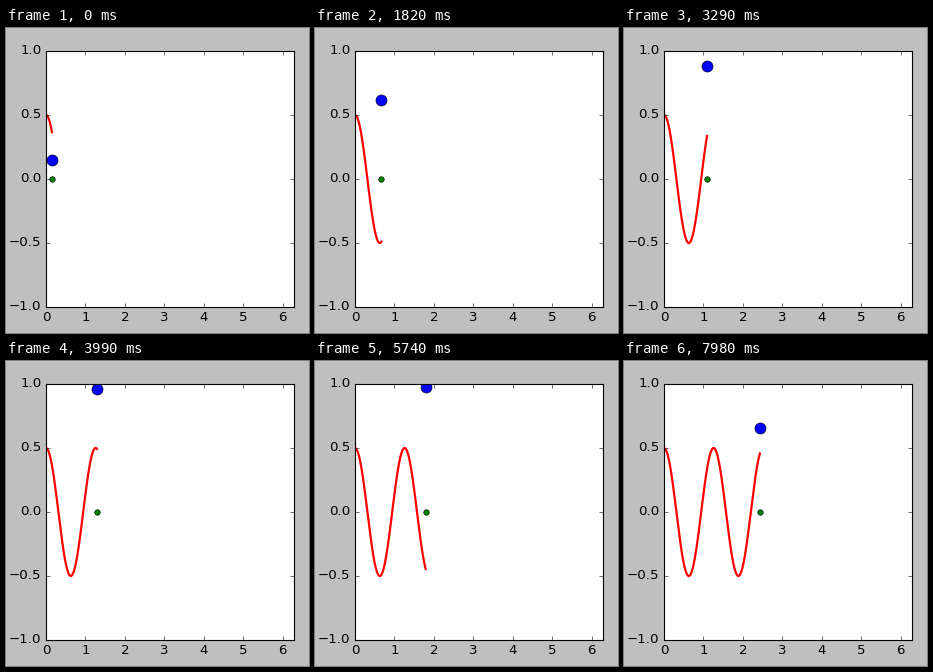
A matplotlib script for the animation above (8 s loop, 303 by 305 pixels).

```python
import numpy as np
import matplotlib.pyplot as plt
from matplotlib.animation import FuncAnimation

plt.style.use("classic")

W, H, DPI = 303, 305, 80
TICK, HOLD, LOOP = 20, 70, 8000   # ms
X0, DX = 0.15, 0.02               # start and advance per step

fig = plt.figure(figsize=(W / DPI, H / DPI), dpi=DPI, facecolor="0.75")
ax = fig.add_axes([40 / W, 26 / H, 248 / W, 256 / H])
ax.set_xlim(0, 2 * np.pi)
ax.set_ylim(-1, 1)
ax.set_xticks(range(7))
ax.set_yticks(np.arange(-1, 1.1, 0.5))

wave, = ax.plot([], [], "r-", lw=2)
ball, = ax.plot([], [], "bo", ms=10)
dot, = ax.plot([], [], "go", ms=5)


def update(i):
    step = (i * TICK + TICK // 2) // HOLD
    x = X0 + DX * step
    xs = np.linspace(0, x, 16 + 2 * step)
    wave.set_data(xs, 0.5 * np.cos(5 * xs))
    ball.set_data([x], [np.sin(x)])
    dot.set_data([x], [0])
    return wave, ball, dot


anim = FuncAnimation(fig, update, frames=LOOP // TICK, interval=TICK,
                     init_func=lambda: update(0), repeat=True,
                     repeat_delay=0, blit=False)
plt.show()
```
